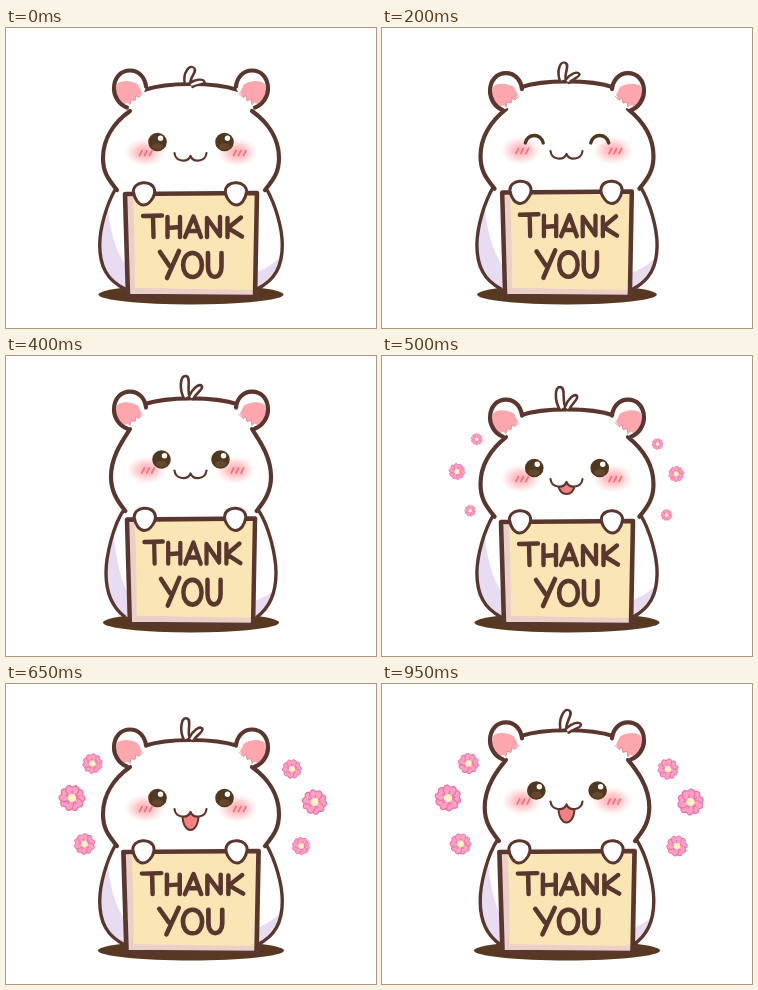
An HTML page with a canvas that plays this animation: 370x300 px, repeating every 1000 ms.

```html
<!DOCTYPE html>
<html lang="en">
<head>
<meta charset="utf-8">
<title>Thank you</title>
<style>
html, body { margin: 0; width: 100%; height: 100%; overflow: hidden; background: #fff; }
canvas { display: block; width: 370px; height: 300px; }
</style>
</head>
<body>
<canvas id="stage" role="img" aria-label="A white hamster holding a sign: THANK YOU"></canvas>
<script>
const W = 370, H = 300, LOOP = 1000, STEP = 50, CX = 185;
const LINE = '#5a372e', EYE = '#503820', LILAC = '#e8dcf2';
const canvas = document.getElementById('stage');
const c = canvas.getContext('2d');
const dpr = window.devicePixelRatio || 1;
canvas.width = W * dpr;
canvas.height = H * dpr;

// Steps as [time, value] pairs
const LIFT = [[0, 0], [200, 2], [400, 10.5], [450, 9], [500, 2], [550, -3], [650, 0], [750, 7.5], [1000, 7.5]];
const EAR = [[0, -3], [200, 1.5], [400, 0], [1000, 0]];
const SIGN = [[0, 165], [200, 163.5], [400, 162.5], [450, 163], [550, 167], [1000, 167]];
const TILT = [[0, 30], [200, 14], [400, 4], [550, -2], [650, 6], [750, 24], [1000, 24]];
const TALL = [[0, .76], [200, .82], [400, .98], [550, 1], [650, .95], [750, .9], [1000, .9]];
const GAPE = [[450, 0], [500, .6], [550, 1], [1000, 1]];
const SPREAD = [[500, -.5], [550, 0], [650, 1], [1000, 1]];

// start x, y, end x, y, radius at 550, 650, 750, 950
const FLOWERS = [
  [72, 115, 66, 114, 11.5, 13, 12.5, 13],
  [92, 82, 86.5, 79.5, 8.2, 9.8, 9.3, 10.2],
  [85, 156.5, 78.5, 160, 8, 10.4, 10.2, 10.5],
  [279, 87, 286, 85, 8, 9.6, 8.8, 10.2],
  [299, 118, 308.5, 118, 11, 12.3, 11.3, 13],
  [288, 160, 295, 162, 8, 8.8, 6.5, 10.3]
];

function key(t, rows) {
  if (t <= rows[0][0]) return rows[0][1];
  for (let i = 1; i < rows.length; i++) {
    const [a, u] = rows[i - 1], [b, v] = rows[i];
    if (t <= b) return u + (v - u) * (t - a) / (b - a);
  }
  return rows[rows.length - 1][1];
}

function shape(d, fill, stroke, width) {
  const p = new Path2D(d);
  if (fill) { c.fillStyle = fill; c.fill(p); }
  if (stroke) { c.strokeStyle = stroke; c.lineWidth = width; c.stroke(p); }
}

function oval(x, y, rx, ry, fill) {
  c.beginPath();
  c.ellipse(x, y, rx, ry, 0, 0, Math.PI * 2);
  c.fillStyle = fill;
  c.fill();
}

function at(x, y, sx, sy, draw) {
  c.save();
  c.translate(x, y);
  c.scale(sx, sy);
  draw();
  c.restore();
}

// Draws once per side; x runs outwards from the middle
const both = draw => [-1, 1].forEach(s => at(CX, 0, s, 1, () => draw(s)));

function body(d) {
  const nx = 75 - .8 * d, ny = 160 - .67 * d, bw = 91.3 - .6 * d;
  const side = `M${nx} ${ny} C${bw - 7} ${ny + 16} ${bw} 200 ${bw} 217 C${bw} 238 ${bw - 7} 252 66 261`;
  both(s => {
    const half = side + ` L-1 261 L-1 ${ny} Z`;
    shape(half, '#fff');
    c.save();
    c.clip(new Path2D(half));
    if (s < 0) shape(`M${bw} 172 L${bw - 8} 180 Q${bw - 12} 222 60 244 L60 265 L100 265 L100 172 Z`, LILAC);
    else shape('M95 222 Q82 240 60 246 L60 265 L100 265 Z', LILAC);
    c.restore();
    shape(side, null, LINE, 3.4);
  });
}

function head(d, earShift) {
  const nx = 75 - .8 * d, ny = 160 - .67 * d;
  const hw = 88 - .76 * d, my = 130 - .9 * d;
  const ey = 83 - .95 * d, top = 57 - 1.3 * d;
  const side = `M${nx - 1} ${ny + 2} C${nx + 8} ${ny - 9} ${hw} ${my + 14} ${hw} ${my} C${hw} ${my - 21} ${hw - 13} ${ey + 10} 61 ${ey}`;
  const crown = `L47 ${top + 5} C32 ${top} 15 ${top - 1} 0 ${top - 1}`;
  both(() => {
    shape(`${side} ${crown} L-1 ${top - 1} L-1 ${ny + 2} Z`, '#fff');
    shape(side, null, LINE, 4.2);
    shape('M' + crown.slice(1), null, LINE, 4.2);
    at(61, 62.5 - .95 * d + earShift, 1, 1, ear);
  });
}

function ear() {
  shape('M3 20 C11 17 16 9 16 1 C16 -10 9 -17 0 -17 C-9 -17 -15 -10 -16 0 L-10 14 Z', '#fff');
  shape('M6 17 C13 12 15 4 13 -3 C9 -8 -2 -7 -8 -3 L-12 5 L-9 10 L-6 8 L-5 13 L-1 12 L0 17 L3 15 Z', '#fca6ae');
  shape('M3 20 C11 17 16 9 16 1 C16 -10 9 -17 0 -17 C-9 -17 -15 -10 -16 -1', null, LINE, 4.2);
  shape('M-13 6 L-9 10 L-6 8 L-5 13 L-1 12 L0 17', null, '#d9828a', .8);
}

function hair(d, tilt, tall) {
  c.save();
  c.translate(182, 56.5 - 1.3 * d);
  c.rotate(tilt * Math.PI / 180);
  c.scale(1, tall);
  shape('M-4 0 C-10 -10 -9 -23 -4 -23 C2 -23 -2 -11 1 -4', '#fff', LINE, 2.6);
  shape('M1 -3 C4 -11 10 -17 13 -14 C15 -11 8 -7 5 0', '#fff', LINE, 2.6);
  c.restore();
}

function face(d, shut, gape) {
  const y = 114 - d, ex = 33.5 - .38 * d, bx = 46.5 - .22 * d;
  [-1, 1].forEach(s => {
    at(CX + s * bx, y + 10.5, 20, 14, () => {
      const g = c.createRadialGradient(0, 0, 0, 0, 0, 1);
      g.addColorStop(0, 'rgba(255,150,160,.8)');
      g.addColorStop(.45, 'rgba(255,165,172,.6)');
      g.addColorStop(1, 'rgba(255,190,195,0)');
      oval(0, 0, 1, 1, g);
    });
    at(CX + s * bx + (s < 0 ? 1 : 2), y + 10.5, 1, 1, () =>
      shape('M-6 3 L-3.5 -2 M-1 3 L1.5 -2 M4 3 L6.5 -2', null, '#f2737f', 1.7));
    at(CX + s * ex, y, 1, 1, () => {
      if (shut) shape('M-9 3 C-6 -7 6 -7 9 3', null, EYE, 3.3);
      else {
        oval(0, 0, 9.3, 9.3, EYE);
        oval(0, 4.5, 5.5, 3.2, '#66492c');
        oval(3, -3.8, 2.7, 2.7, '#fff');
      }
    });
  });
  at(184.5, y + 12, 1, 1, () => {
    if (gape > 0) shape(`M-8 5 C-8 ${5 + 10 * gape} -4 ${5 + 15 * gape} 0 ${5 + 15 * gape} C4 ${5 + 15 * gape} 8 ${5 + 10 * gape} 8 5 L0 2 Z`, '#f4807f', LINE, 2);
    shape('M-16 -1 C-15 8 -3 9 0 2 C3 9 15 8 16 -1', gape > 0 ? '#fff' : null);
    shape('M-16 -1 C-15 8 -3 9 0 2 C3 9 15 8 16 -1', null, LINE, 2.2);
  });
}

function sign(y) {
  at(CX, 268, 1 + .012 * (y - 165), (268 - y) / 103, () => {
    c.translate(-CX, -268);
    shape('M119 166 L251 165 L249 269 L122 268 Z', '#fae5b5');
    shape('M120 167 L127 167 Q129 215 129 260 L249 262 L249 269 L122 268 Z', '#ebd0c9');
    shape('M119 166 L251 165 L249 269 L122 268 Z', null, LINE, 4.6);
    // THANK
    shape('M137 188 L156 187.5 M147 188 L147.5 209 M161.5 189 L161.5 209 M174 189 L174 209 M161.5 200 L174 199' +
      'M179 209 L187.5 188.5 L195 209 M182 203 L193 203 M201 209 L201 190 L214 208 L214 189 M221.5 190 L221.5 209 M235 189.5 L222 200 L236 208.5', null, LINE, 4.4);
    // YOU
    shape('M154 224 L163.5 238 M173 223 L161 250 M186.5 225 C174 225 174 249 186.5 249 C199 249 199 225 186.5 225' +
      'M202 225 L202 239 C202 252 215.5 252 215.5 239 L215.5 225', null, LINE, 4.6);
  });
  const spread = 46.5 + .3 * (y - 165);
  [-1, 1].forEach(s => at(CX - 1 + s * spread, y + 1, -s, 1, () =>
    shape('M-10 -2 C-11 -13 9 -15 11 -4 C12 2 6 11 0 11 C-5 11 -9 5 -10 -2 Z', '#fff', LINE, 3)));
}

function flower(x, y, r, turn) {
  c.save();
  c.translate(x, y);
  c.rotate(turn);
  c.scale(r / 13, r / 13);
  for (let i = 0; i < 5; i++) {
    c.rotate(Math.PI * 2 / 5);
    shape('M0 0 C-8 -4 -8 -12 -3 -12.5 L0 -11 L3 -12.5 C8 -12 8 -4 0 0 Z', '#fb9fc5', '#ed6fa4', 1.2);
  }
  for (let i = 0; i < 5; i++) {
    c.rotate(Math.PI * 2 / 5);
    shape('M0 -3 L0 -7', null, '#f06fa6', 1.3);
  }
  oval(0, 0, 4.2, 4.2, '#fff3bf');
  c.restore();
}

function draw(t) {
  const d = key(t, LIFT), y = key(t, SIGN);
  c.setTransform(dpr, 0, 0, dpr, 0, 0);
  c.lineCap = c.lineJoin = 'round';
  c.fillStyle = '#fff';
  c.fillRect(0, 0, W, H);
  oval(CX, 266.5, Math.min(93, 92.5 + 1.8 * (y - 165)), 10, '#573820');
  body(d);
  head(d, key(t, EAR));
  hair(d, key(t, TILT), key(t, TALL));
  face(d, t >= 100 && t < 300, key(t, GAPE));
  sign(y);
  if (t >= 500) {
    const k = key(t, SPREAD);
    FLOWERS.forEach(([x0, y0, x1, y1, a, b, e, f], i) => {
      const r = key(t, [[500, a * .7], [550, a], [650, b], [750, e], [950, f]]);
      flower(x0 + (x1 - x0) * k, y0 + (y1 - y0) * k, r, .25 * Math.sin(t / 70 + i));
    });
  }
}

let origin = null;
function tick(now) {
  if (origin === null) origin = now;
  const t = (now - origin) % LOOP;
  draw(Math.floor(t / STEP) * STEP);
  requestAnimationFrame(tick);
}
draw(0);
requestAnimationFrame(tick);
</script>
</body>
</html>
```
